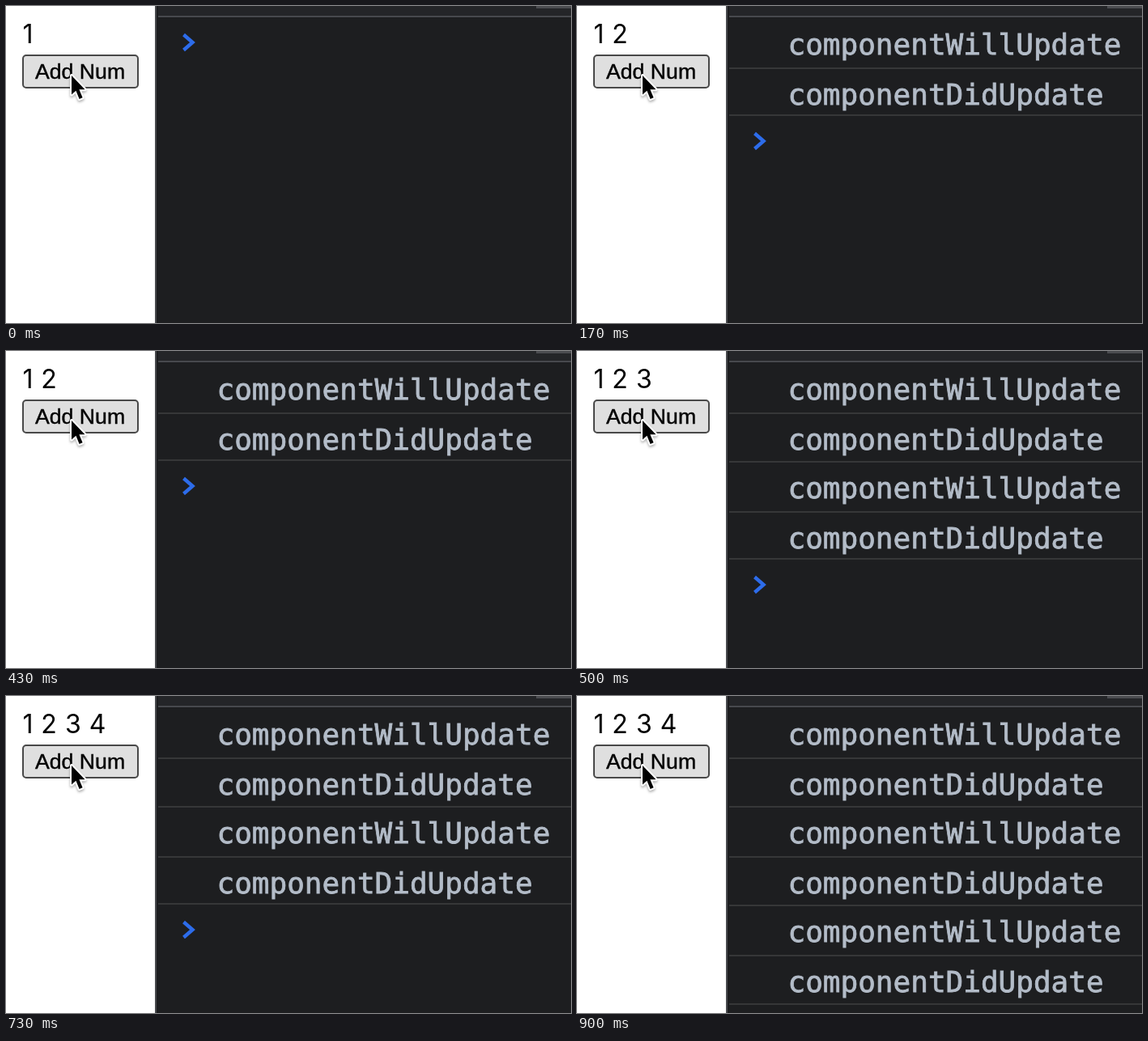
An HTML page for the animation above (1.16 s loop, 698 by 392 pixels).

```html
<!DOCTYPE html>
<html lang="en">
<head>
<meta charset="utf-8">
<title>Component update log</title>
<style>
html, body { margin: 0; width: 100%; height: 100%; overflow: hidden; background: #fff; }
svg { display: block; width: 698px; height: 392px; }

.num { font: 32px Inter, Roboto, sans-serif; text-anchor: middle; }
.label { font: 26.67px "Liberation Sans", Arial, sans-serif; stroke: #000; stroke-width: .4; }
.log { font: 36px "DejaVu Sans Mono", Menlo, monospace; fill: #b3bcc8; stroke: #b3bcc8; stroke-width: .8; }
.rule { fill: #363738; }

/* every change is a hard cut within one 1160 ms loop */
.cut { animation: 1160ms step-end infinite; }
.two { animation-name: two; }
.three { animation-name: three; }
.four { animation-name: four; }
.pair1 { animation-name: pair1; }
.pair2 { animation-name: pair2; }
.row5 { animation-name: row5; }
.row6 { animation-name: row6; }
.end1 { animation-name: end1; }
.end2 { animation-name: end2; }
.prompt { animation-name: prompt; }
.button { animation-name: press; }

@keyframes two { from { opacity: 0 } 11.207%, to { opacity: 1 } }
@keyframes three { from { opacity: 0 } 39.655%, to { opacity: 1 } }
@keyframes four { from { opacity: 0 } 62.931%, to { opacity: 1 } }
@keyframes pair1 { from { opacity: 0 } 14.655%, to { opacity: 1 } }
@keyframes pair2 { from { opacity: 0 } 43.103%, to { opacity: 1 } }
@keyframes row5 { from { opacity: 0 } 66.379%, to { opacity: 1 } }
@keyframes row6 { from { opacity: 0 } 72.414%, to { opacity: 1 } }

/* the last divider sits 2px higher until another row follows */
@keyframes end1 { from { transform: translateY(-2px) } 43.103%, to { transform: none } }
@keyframes end2 { from { transform: translateY(-2px) } 66.379%, to { transform: none } }

@keyframes prompt {
  from { transform: none }
  14.655% { transform: translateY(122px) }
  43.103% { transform: translateY(244px) }
  66.379% { transform: translateY(305px) }
  72.414%, to { transform: translateY(366px) }
}
@keyframes press {
  from, 11.207%, 37.069%, 60.345%, to { fill: #dfdfdf; stroke: #484848 }
  2.586%, 31.897%, 57.759% { fill: #f4f4f4; stroke: #858585 }
}
</style>
</head>
<body>
<svg viewBox="0 0 698 392">
  <rect width="698" height="392" fill="#fff"/>

  <g class="num">
    <text x="27" y="46">1</text>
    <text class="cut two" x="53" y="46">2</text>
    <text class="cut three" x="83" y="46">3</text>
    <text class="cut four" x="113" y="46">4</text>
  </g>

  <rect class="cut button" x="21" y="61" width="142" height="40" rx="4" stroke-width="2"/>
  <text class="label" x="36" y="90">Add Num</text>

  <rect x="184" width="514" height="392" fill="#1d1e20"/>
  <rect x="184" width="2" height="392" fill="#47494d"/>
  <rect x="188" width="510" height="12" fill="#242528"/>
  <rect x="188" y="12" width="510" height="2" fill="#47494d"/>
  <rect x="655" width="43" height="3" fill="#4b4c50"/>

  <g class="cut pair1">
    <text class="log" x="260.5" y="60">componentWillUpdate</text>
    <rect class="rule" x="188" y="76" width="510" height="2"/>
    <text class="log" x="260.5" y="122">componentDidUpdate</text>
    <rect class="rule cut end1" x="188" y="136" width="510" height="2"/>
  </g>
  <g class="cut pair2">
    <text class="log" x="260.5" y="182">componentWillUpdate</text>
    <rect class="rule" x="188" y="198" width="510" height="2"/>
    <text class="log" x="260.5" y="244">componentDidUpdate</text>
    <rect class="rule cut end2" x="188" y="258" width="510" height="2"/>
  </g>
  <g class="cut row5">
    <text class="log" x="260.5" y="304">componentWillUpdate</text>
    <rect class="rule" x="188" y="320" width="510" height="2"/>
  </g>
  <g class="cut row6">
    <text class="log" x="260.5" y="366">componentDidUpdate</text>
    <rect class="rule" x="188" y="380" width="510" height="2"/>
  </g>

  <path class="cut prompt" d="M219.5 35.5L230.5 45L219.5 54.5" fill="none" stroke="#2d6cea" stroke-width="4.4"/>

  <path d="M81 86V109.5l5.4-4.8 4.2 10.3 4-1.7-4.2-10.1H97.5Z"
    stroke="#fff" stroke-width="4" stroke-linejoin="round" paint-order="stroke"
    style="filter: drop-shadow(0 2px 1.5px rgba(0, 0, 0, .3))"/>
</svg>
</body>
</html>
```
